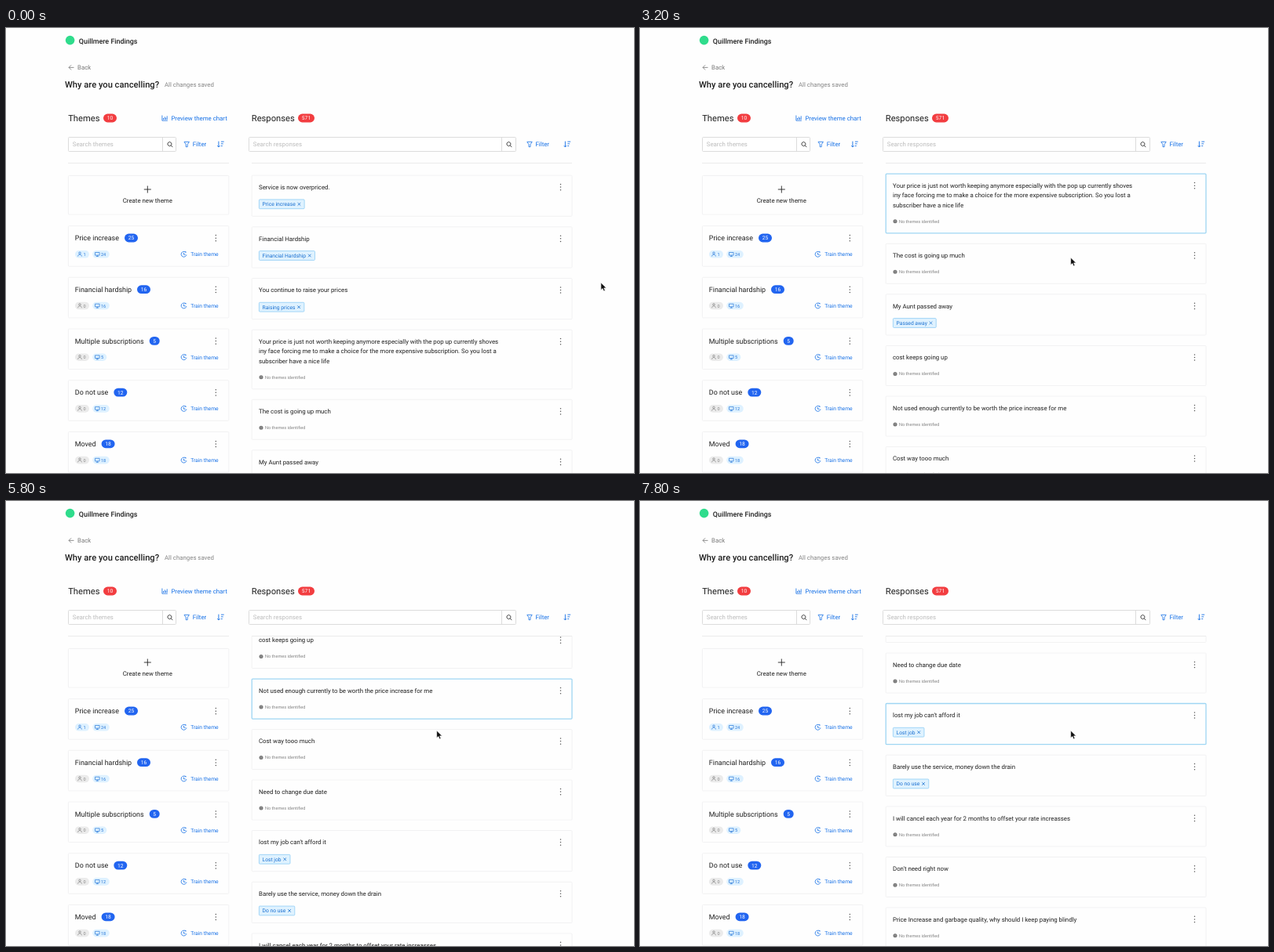
An HTML page that plays this animation: 800x568 px, repeating every 8 s.

```html
<!DOCTYPE html>
<html lang="en">
<head>
<meta charset="utf-8">
<title>Survey themes</title>
<style>
  html, body { margin: 0; width: 100%; height: 100%; overflow: hidden; background: #fefefe; }
  svg { display: block; }
  text { font-family: Roboto, sans-serif; text-rendering: geometricPrecision; white-space: pre; }
</style>
</head>
<body>
<svg id="stage" width="800" height="568" viewBox="0 0 800 568">
  <defs><clipPath id="listArea"><rect x="300" y="172.5" width="440" height="396"/></clipPath></defs>
  <g id="page"></g>
  <g clip-path="url(#listArea)"><g id="list"></g></g>
  <path id="cursor" d="M0 0V9.6L2.2 7.6L3.8 11L5.5 10.2L4 6.9H7Z" fill="#111" stroke="#fff" stroke-width=".7"/>
</svg>
<script>
const INK = '#1f1f1f', BLUE = '#1570e6', GRAY = '#858585', LINE = '#efeff0';
const TITLE = 11.18, LABEL = 8.94, BODY = 7.83, SMALL = 6.71, TINY = 5.59;
const LOOP = 8000, STEP = 200;
const page = document.getElementById('page');
const list = document.getElementById('list');
const cursor = document.getElementById('cursor');

function add(parent, tag, attrs, content = '') {
  const node = document.createElementNS('http://www.w3.org/2000/svg', tag);
  for (const name in attrs) node.setAttribute(name, attrs[name]);
  node.textContent = content;
  parent.append(node);
  return node;
}
const text = (parent, x, y, content, size = BODY, fill = INK, more = {}) =>
  add(parent, 'text', { x, y, 'font-size': size, fill, ...more }, content);
const box = (parent, x, y, width, height, fill = 'none', stroke = 'none', rx = 0) =>
  add(parent, 'rect', { x, y, width, height, fill, stroke, rx, 'stroke-width': .8 });
const icon = (parent, x, y, d, stroke = BLUE, width = .8) =>
  add(parent, 'path', { d, stroke, fill: 'none', 'stroke-width': width, transform: `translate(${x} ${y})` });
const dot = (parent, cx, cy, r, fill) => add(parent, 'circle', { cx, cy, r, fill });

function badge(x, y, width, label, fill) {
  box(page, x, y - 5.4, width, 10.8, fill, 'none', 5.4);
  text(page, x + width / 2, y + 2.4, label, SMALL, '#fff', { 'text-anchor': 'middle' });
}
function menuDots(parent, x, y) {
  for (const dy of [-3.6, 0, 3.6]) dot(parent, x, y + dy, .75, '#555');
}
function searchBar(x, width, split, hint, filterX, sortX) {
  box(page, x, 139.5, width, 18, '#fff', '#d4d4d4', 1);
  icon(page, split, 139.5, 'M0 0V18', '#d4d4d4');
  text(page, x + 5.3, 151.2, hint, BODY, '#bcbcbc');
  icon(page, split + 8.8, 148.2, 'M1.9 1.6A2.5 2.5 0 1 1 1.9 -1.9A2.5 2.5 0 0 1 1.9 1.6L4 3.9', '#333', .9);
  icon(page, filterX, 145.3, 'M.3 0H6.7L4.5 3.4V6.4H2.5V3.4Z');
  text(page, filterX + 11, 151.2, 'Filter', BODY, BLUE);
  icon(page, sortX, 148.4, 'M-2.4 -3.8V3.4M-4 1.8L-2.4 3.6L-.8 1.8M.6 -3.3H4.4M.6 -.6H3.4M.6 2.1H2.4', BLUE, .9);
}

// Header
dot(page, 81.6, 15.6, 5.8, '#2fdc8c');
text(page, 92.8, 19.9, 'Quillmere Findings', LABEL, INK, { 'font-weight': 500 });
icon(page, 79.5, 50.4, 'M7 0H.5M3.6 -3.1L.5 0L3.6 3.1', '#777');
text(page, 91, 53.2, 'Back', BODY, '#777');
text(page, 75, 76.2, 'Why are you cancelling?', TITLE, INK, { 'font-weight': 500 });
text(page, 202, 75.2, 'All changes saved', BODY, GRAY);
text(page, 79.2, 119, 'Themes', TITLE);
badge(124, 115, 17, '10', '#f23d40');
icon(page, 198.5, 111.5, 'M.4 0V6.7H7.4M2 5.5V3.5M3.7 5.5V1.8M5.2 5.5V3M6.7 5.5V.8');
text(page, 210.4, 117.9, 'Preview theme chart', BODY, BLUE);
text(page, 312.8, 119, 'Responses', TITLE);
badge(372, 115, 21, '571', '#f23d40');
searchBar(79.5, 137, 199.5, 'Search themes', 226.7, 273.3);
searchBar(309.5, 340, 631.5, 'Search responses', 663.5, 714.8);
icon(page, 79, 172.4, 'M0 0H205M234 0H642', '#e6e6e6');

// Themes
box(page, 79.4, 188.4, 204.4, 49.6, 'none', LINE, 1);
icon(page, 180.3, 206, 'M-4.5 0H4.5M0 -4.5V4.5', '#222', .9);
text(page, 180.3, 222.8, 'Create new theme', BODY, INK, { 'text-anchor': 'middle' });

function pill(x, y, width, label, active, shape) {
  const color = active ? '#2878d8' : '#858585';
  box(page, x, y - 4.8, width, 9.6, active ? '#def1ff' : '#ebebeb', 'none', 4.8);
  icon(page, x + 6, y, shape, color, .7);
  text(page, x + 10.6, y + 2, label, TINY, color);
}
const PERSON = 'M0 -2.8A1.3 1.3 0 1 1 0 -.2A1.3 1.3 0 1 1 0 -2.8M-2.4 2.7C-2.2 -.5 2.2 -.5 2.4 2.7';
const SCREEN = 'M-2.8 -2.3H2.8V1.3H-2.8ZM0 1.3V2.7M-1.5 2.7H1.5';
[
  ['Price increase', 25, 151, 1, 24],
  ['Financial hardship', 16, 167, 0, 16],
  ['Multiple subscriptions', 5, 182.7, 0, 5],
  ['Do not use', 12, 137.3, 0, 12],
  ['Moved', 18, 121.6, 0, 18],
].forEach(([name, count, badgeX, people, screens], i) => {
  const y = 252.6 + i * 65.7;
  const wide = count > 9;
  box(page, 79.4, y, 204.4, 51.6, 'none', LINE, 1);
  text(page, 87.8, y + 18.6, name, LABEL);
  badge(badgeX, y + 15.4, wide ? 17 : 13, count, '#2265f0');
  menuDots(page, 267.3, y + 15.6);
  pill(88, y + 36.2, 18, people, people > 0, PERSON);
  pill(110.3, y + 36.2, wide ? 21.5 : 18, screens, true, SCREEN);
  icon(page, 226.5, y + 36.2, 'M2.4 -2.5A3.4 3.4 0 1 0 3.4 .6M0 -1.9V.4H2.2M1.2 -3.4L3.3 -2.6', BLUE);
  text(page, 235.2, y + 38.6, 'Train theme', SMALL, BLUE);
});

// Responses: each entry is its text lines, then an optional tag
let nextTop = 188.1;
const cards = [
  ['Service is now overpriced.', 'Price increase'],
  ['Financial Hardship', 'Financial Hardship'],
  ['You continue to raise your prices', 'Raising prices'],
  ['Your price is just not worth keeping anymore especially with the pop up currently shoves\n' +
   'iny face forcing me to make a choice for the more expensive subscription. So you lost a\n' +
   'subscriber have a nice life'],
  ['The cost is going up much'],
  ['My Aunt passed away', 'Passed away'],
  ['cost keeps going up'],
  ['Not used enough currently to be worth the price increase for me'],
  ['Cost way tooo much'],
  ['Need to change due date'],
  ["lost my job can't afford it", 'Lost job'],
  ['Barely use the service, money down the drain', 'Do no use'],
  ['I will cancel each year for 2 months to offset your rate increasses'],
  ["Don't need right now"],
  ['Price Increase and garbage quality, why should I keep paying blindly'],
].map(([message, tag]) => {
  const top = nextTop;
  const lines = message.split('\n');
  const extra = (lines.length - 1) * 12.3;
  const height = (tag ? 52.2 : 51) + extra;
  const frame = box(list, 313.2, top, 407.8, height, 'none', LINE, 1);
  lines.forEach((line, i) => text(list, 322, top + 17.9 + i * 12.3, line));
  menuDots(list, 706.5, top + 15);
  const y = top + extra + 36.7;
  if (tag) {
    const back = box(list, 322.4, y - 5.9, 0, 11.8, '#dff2ff', '#8fcdf5', 1);
    const width = text(list, 326.6, y + 2.4, tag, SMALL, '#1a70d0').getComputedTextLength();
    back.setAttribute('width', width + 15.6);
    icon(list, 331.3 + width, y, 'M-1.8 -1.8L1.8 1.8M1.8 -1.8L-1.8 1.8', '#1a70d0');
  } else {
    dot(list, 325, y - .8, 2.5, '#777');
    icon(list, 325, y - .8, 'M0 -1.4V.3M0 .8V1.4', '#ddd', .5);
    text(list, 330, y + 1.2, 'No themes identified', TINY, GRAY);
  }
  nextTop += height + 13.5;
  return { frame, top, bottom: top + height };
});

// Motion: [time, scroll offset]
const SCROLL = [[0, 0], [1600, 0], [2000, 8], [2200, 29], [3200, 199],
                [5000, 368.5], [6400, 497], [7800, 604], [8000, 612]];

function scrollAt(t) {
  const i = Math.max(1, SCROLL.findIndex(([time]) => time >= t));
  const [t0, s0] = SCROLL[i - 1], [t1, s1] = SCROLL[i];
  return s0 + (s1 - s0) * (t - t0) / (t1 - t0);
}
function pointerAt(t) {
  const p = Math.min(t / 1200, 1);
  const eased = p * p * (3 - 2 * p);
  return { x: 757.8 - 209.2 * eased, y: 325 - 32 * eased };
}

function draw(t) {
  const pointer = pointerAt(t);
  list.setAttribute('transform', `translate(0 ${-scrollAt(t)})`);
  cursor.setAttribute('transform', `translate(${pointer.x} ${pointer.y})`);

  // The highlight trails the pointer by one step
  const before = Math.max(0, t - STEP);
  const last = pointerAt(before);
  const y = last.y + scrollAt(before);
  for (const { frame, top, bottom } of cards) {
    const hovered = last.x < 721 && y >= top - 6 && y < bottom + 7;
    frame.setAttribute('stroke', hovered ? '#9fd6f3' : LINE);
    frame.setAttribute('stroke-width', hovered ? 1.3 : .8);
  }
}

function tick() {
  const t = performance.now() % LOOP;
  draw(Math.floor(t / STEP) * STEP);
  requestAnimationFrame(tick);
}
tick();
</script>
</body>
</html>
```
